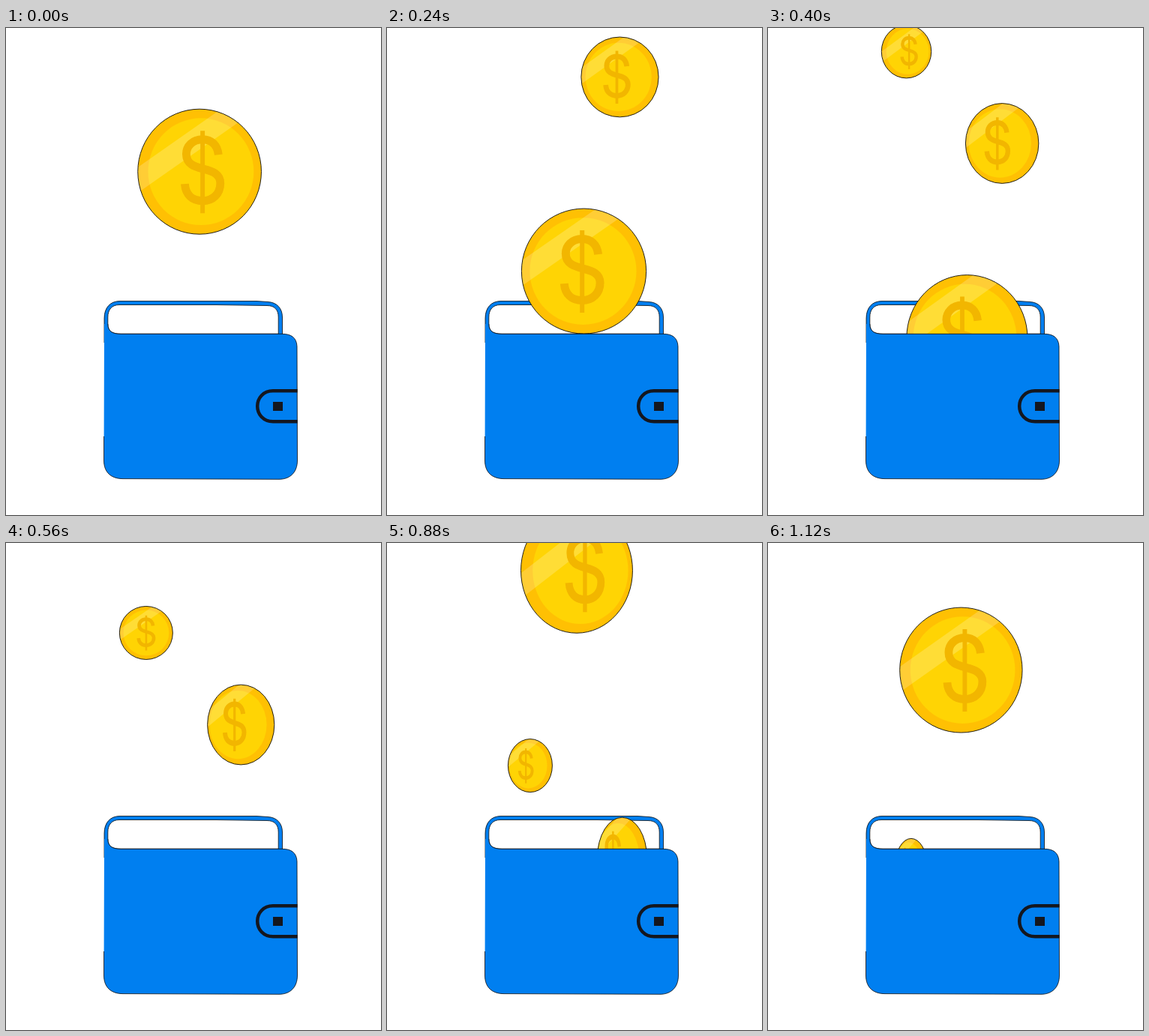
Animation of 500x650 px, one loop 1160 ms. Source, as an HTML page with a canvas:

```html
<!DOCTYPE html>
<html lang="en">
<head>
<meta charset="utf-8">
<title>Coins falling into a wallet</title>
<style>
html, body { margin: 0; width: 100%; height: 100%; overflow: hidden; background: #fff; }
canvas { display: block; }
</style>
</head>
<body>
<canvas width="500" height="650"></canvas>
<script>
const ctx = document.querySelector('canvas').getContext('2d');
const LOOP = 1160, STEP = 40, SPEED = 0.5535, R = 83.5;
const BLUE = '#007ff0', DARK = '#14171f', LINE = '#0b0b0b';

const back = new Path2D('M131 420V388C131 373 139 364.5 152 364.5H334L349 365.5C361 366 368.5 374 368.5 386V420Z');
const hole = new Path2D('M135.8 386C135.8 376 141 369.5 151 369.5H280L348 370.5C358 370.5 363.2 376 363.2 386V408.3H153C142 408.3 135.8 405 135.8 395Z');
const body = new Path2D('M131 395H135.8C135.8 405 142 408.3 153 408.3H368C380 408.3 387.5 413 388 425L388.5 577C388.5 593 379 602.3 364 602.3L156 601.6C140 601.6 130.5 593 130.5 577Z');
const edge = new Path2D('M135.8 395C135.8 405 142 408.3 153 408.3H368C380 408.3 387.5 413 388 425L388.5 577C388.5 593 379 602.3 364 602.3L156 601.6C140 601.6 130.5 593 130.5 577V545');
const clasp = new Path2D('M388.6 484.3H356C343 484.3 335.2 494 335.2 504.7S343 525.2 356 525.2H388.6');
const ess = new Path2D('M21.5 -23C20 -36 12 -43.5 0 -43.5C-14 -43.5 -22 -34 -22 -24C-22 -10 -10 -7 1 -4C14 -1 24 3 24 15C24 29 14 38.5 0 38.5C-14 38.5 -23 30 -24 16');
const stem = new Path2D('M0 -55V55');
const shine = new Path2D('M-130 28L100 -131V-97L-130 62Z');

// All coins fall at one speed; x and turn (degrees) follow the coin's own time.
// A coin is shown from its start time until the wallet hides it.
const coins = [
  { r: 83.5, start: -360, y0: 191.7, x: t => 258.1 + 0.0183 * t, turn: t => -9.5 + 0.0622 * t },
  { r: 53.4, start: 0, y0: -67.4, x: t => 313.7 - 1.2e-5 * (t - 760) ** 2, turn: t => 1 + 0.0578 * t },
  { r: 35.5, start: 0, y0: -190, x: t => 187 + 4.3 * Math.sin((t - 570) * 0.00365),
    turn: t => 17.8 + 0.1067 * (t - 720) - 4.17e-5 * (t - 720) ** 2 }
];

function fill(path, color) {
  ctx.fillStyle = color;
  ctx.fill(path);
}

function stroke(path, color, width) {
  ctx.strokeStyle = color;
  ctx.lineWidth = width;
  ctx.stroke(path);
}

function oval(x, rx, ry) {
  const path = new Path2D();
  path.ellipse(x, 0, rx, ry, 0, 0, 2 * Math.PI);
  return path;
}

function drawCoin({ r, start, y0, x, turn }, now) {
  const t = start + (now - start) % LOOP;
  const angle = turn(t) * Math.PI / 180;
  const sin = Math.sin(angle), cos = Math.cos(angle);
  const rim = oval(0, r * cos, r);

  ctx.save();
  ctx.translate(x(t), y0 + SPEED * t);
  fill(rim, '#ffc003');
  fill(oval(-0.13 * r * sin, 0.855 * r * cos, 0.855 * r), '#ffd404');

  ctx.save();
  ctx.clip(rim);
  ctx.scale(r / R * cos, r / R);
  ctx.translate(-R * (0.12 + 0.56 * sin), 0);
  fill(shine, 'rgba(255,255,255,.2)');
  ctx.restore();

  ctx.save();
  ctx.translate(-0.29 * r * sin, 0.5 * r / R);
  ctx.scale(r / R * cos, r / R);
  stroke(ess, '#f2b600', 11);
  stroke(stem, '#f2b600', 6);
  ctx.restore();

  stroke(rim, LINE, 0.9);
  ctx.restore();
}

function draw(now) {
  ctx.fillStyle = '#fff';
  ctx.fillRect(0, 0, 500, 650);
  fill(back, BLUE);
  stroke(back, LINE, 0.8);
  fill(hole, '#fff');
  stroke(hole, LINE, 0.8);

  ctx.save();
  ctx.beginPath();
  ctx.rect(0, 0, 500, 408.5);
  ctx.clip();
  coins.forEach(coin => drawCoin(coin, now));
  ctx.restore();

  fill(body, BLUE);
  stroke(edge, LINE, 0.8);
  stroke(clasp, DARK, 4.5);
  ctx.fillStyle = DARK;
  ctx.fillRect(356, 499, 13, 12);
}

function frame() {
  draw(Math.floor(performance.now() % LOOP / STEP) * STEP);
  requestAnimationFrame(frame);
}
frame();
</script>
</body>
</html>
```
